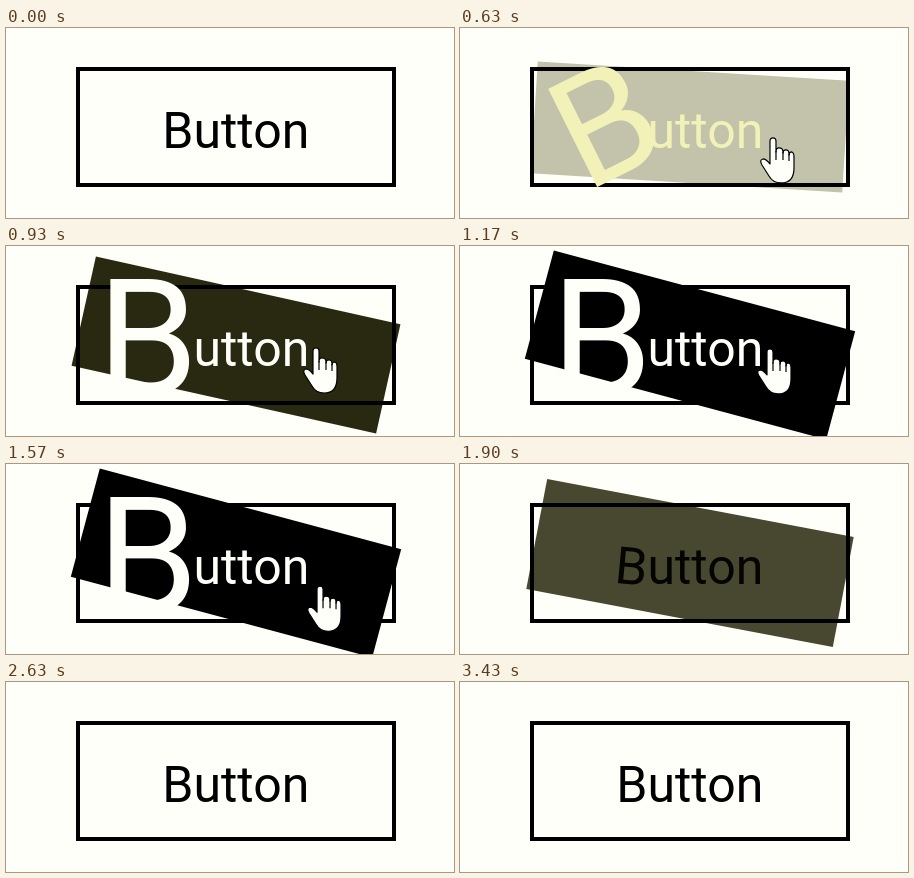
An HTML page that plays this animation: 448 by 190 pixels, repeating every 3460 ms.

```html
<!DOCTYPE html>
<html>
<head>
<meta charset="utf-8">
<style>
  html, body { margin: 0; width: 100%; height: 100%; overflow: hidden; background: #fffffa; }
  svg { display: block; width: 448px; height: 190px; }
  text { font: 50px Roboto, sans-serif; }
</style>
</head>
<body>
<svg viewBox="0 0 448 190">
  <rect id="panel" x="-156" y="-56" width="312" height="112"/>
  <rect x="72" y="41" width="316" height="116" fill="none" stroke="#000" stroke-width="4"/>
  <g id="label">
    <text x="187.4" y="120">utton</text>
    <g id="initial"><text x="-17.25" y="17.8">B</text></g>
  </g>
  <g id="hand" fill="#fffffa" stroke="#000" stroke-width="1.2" stroke-linejoin="round">
    <path d="M-3 3Q-3 0 0 0Q3 0 3 3V14Q3 10 6 10Q10 10 10 14V15Q10 12 13 12Q16 12 16 16V17Q16 14 19 14Q21 15 21 18V30Q21 45 8 45Q0 45-4 38L-11 27Q-14 22-10 21Q-7 21-3 26Z"/>
    <path d="M3 13V22M10 14V22M16 16V23" fill="none"/>
  </g>
</svg>
<script>
const LOOP = 3460, ENTER = 410, LEAVE = 1655;
const [panel, label, initial, hand] =
  ['panel', 'label', 'initial', 'hand'].map(id => document.getElementById(id));

// Pointer fingertip: time, x, y
const path = [
  [30, 330, 194], [300, 322, 168], [414, 318, 148], [630, 313, 110], [930, 310, 102],
  [1200, 310, 103], [1570, 314, 122], [1634, 316, 138], [1840, 322, 194]
];

const clamp = x => Math.min(1, Math.max(0, x));
const smooth = x => (x = clamp(x), x * x * (3 - 2 * x));
const hover = (t, duration) =>
  smooth((t - ENTER) / duration) - smooth((t - LEAVE) / duration);

function pointerAt(t) {
  const i = path.findIndex(point => point[0] > t);
  if (i < 1) return [0, 300];
  const [t0, x0, y0] = path[i - 1], [t1, x1, y1] = path[i];
  const k = (t - t0) / (t1 - t0);
  return [x0 + (x1 - x0) * k, y0 + (y1 - y0) * k];
}

function draw(t) {
  const tilt = hover(t, 700), spin = hover(t, 265);

  const shade = 255 * (1 - tilt);
  const blue = Math.max(0, shade - 24 * clamp(tilt * 8));
  panel.setAttribute('fill', tilt > 0.001 ? `rgb(${shade},${shade},${blue})` : 'none');
  panel.setAttribute('transform', `translate(230 99) rotate(${15 * tilt})`);

  const light = 255 * clamp(spin * 1.02);
  label.setAttribute('fill', `rgb(${light},${light},${250 * spin ** 4})`);
  initial.setAttribute('transform',
    `translate(${173.5 - 26.5 * spin} ${102.2 - 11.2 * spin}) rotate(${360 * spin}) scale(${1 + 2.25 * spin})`);

  hand.setAttribute('transform', `translate(${pointerAt(t)})`);
}

function tick() {
  draw(performance.now() % LOOP);
  requestAnimationFrame(tick);
}
tick();
</script>
</body>
</html>
```
